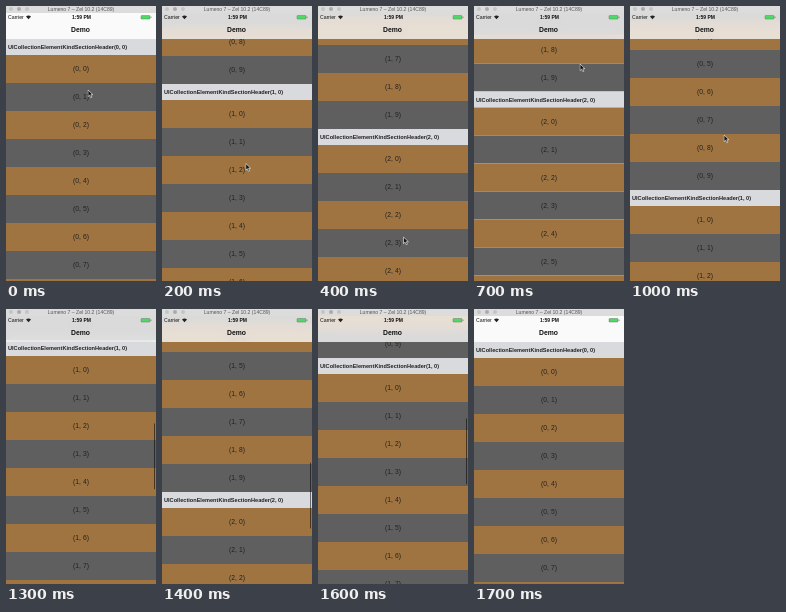
Animation, 150 px wide and 275 px high, one loop 2 s. Source, as an HTML page:

```html
<!DOCTYPE html>
<html lang="en">
<head>
<meta charset="utf-8">
<style>
  html, body { margin: 0; width: 100%; height: 100%; overflow: hidden; }
  body { position: relative; background: #fff; color: #222; font-family: "Liberation Sans", Arial, sans-serif; }
  body > * { position: absolute; }
  #list { top: 33px; left: 0; width: 150px; }
  .row { height: 28px; line-height: 28px; font-size: 6.8px; text-align: center; background: #9f7441; }
  .row.odd { background: #5f5f5f; }
  .head { height: 16px; line-height: 16px; padding-left: 2px; font-size: 5.6px; font-weight: bold; background: #d9dadd; white-space: nowrap; }
  #thumb { top: 33px; right: 1px; width: 1.2px; border-radius: 1px; background: #0008; }
  #nav { top: 7px; left: 0; width: 150px; height: 26px; background: #f9f9f9cc; backdrop-filter: blur(5px); }
  #title { top: 0; left: 0; width: 150px; height: 7px; background: #dcdcdc; }
  #icons { top: 0; left: 0; }
  #cursor { top: 0; left: 0; }
  text { fill: #111; }
</style>
</head>
<body>
<div id="list"></div>
<div id="thumb"></div>
<div id="nav"></div>
<div id="title"></div>
<svg id="icons" width="150" height="33">
  <g fill="#c4c4c4"><circle cx="5" cy="3" r="2"/><circle cx="13" cy="3" r="2" fill="#aaa"/><circle cx="21" cy="3" r="2"/></g>
  <text x="75" y="5" font-size="5.1" text-anchor="middle" style="fill:#555">Lumeno 7 – Zel 10.2 (14C89)</text>
  <text x="2" y="13" font-size="5.2">Carrier</text>
  <path d="M20 10.5q2.5-2 5 0L22.5 13.3z" fill="#222"/>
  <text x="75.5" y="13" font-size="5" font-weight="bold" text-anchor="middle">1:59 PM</text>
  <rect x="135" y="9.5" width="9" height="3.6" rx=".7" fill="#4cd964" stroke="#666" stroke-width=".4"/>
  <path d="M145 10.6v1.4" stroke="#666" stroke-width=".7"/>
  <text x="74.5" y="26" font-size="6.8" font-weight="bold" text-anchor="middle">Demo</text>
</svg>
<svg id="cursor" width="8" height="10">
  <path d="M.5.5v6.6l1.6-1.4 1.1 2.5 1.2-.5-1.1-2.5h2.1z" fill="#111" stroke="#fff" stroke-width=".6"/>
</svg>
<script>
const LOOP = 2000, STEP = 100, LAST = 1700;
const SECTIONS = 3, ROWS = 10, VIEW = 242;
const CONTENT = SECTIONS * (16 + ROWS * 28);

// Each key is [time, ...values]
const scrollKeys = [[0, 0], [400, 502], [550, 640], [700, 539.5], [1000, 145],
  [1100, 0], [1300, 298], [1400, 442], [1500, 560], [1700, 0]];
const cursorKeys = [[0, 82, 84], [400, 85.5, 231], [700, 106, 58], [1000, 94, 129], [1200, 90, 176]];

const $ = id => document.getElementById(id);

function add(className, text) {
  const el = document.createElement('div');
  el.className = className;
  el.textContent = text;
  $('list').append(el);
}

for (let s = 0; s < SECTIONS; s++) {
  add('head', `UICollectionElementKindSectionHeader(${s}, 0)`);
  for (let r = 0; r < ROWS; r++) add(r % 2 ? 'row odd' : 'row', `(${s}, ${r})`);
}
$('thumb').style.height = VIEW * VIEW / CONTENT + 'px';

function sample(keys, t) {
  const next = keys.findIndex(k => k[0] > t);
  if (next < 0) return keys.at(-1).slice(1);
  const a = keys[next - 1], b = keys[next];
  const p = (t - a[0]) / (b[0] - a[0]);
  return a.slice(1).map((v, i) => v + (b[i + 1] - v) * p);
}

function draw(now) {
  const t = Math.min(LAST, Math.floor(now % LOOP / STEP) * STEP);
  const [scroll] = sample(scrollKeys, t);
  const [x, y] = sample(cursorKeys, t);
  $('list').style.transform = `translateY(${-scroll}px)`;
  $('thumb').style.transform = `translateY(${scroll * VIEW / CONTENT}px)`;
  $('thumb').style.opacity = t >= 1200 && t < LAST ? 1 : 0;
  $('cursor').style.transform = `translate(${x - 0.5}px, ${y - 0.5}px)`;
  $('cursor').style.opacity = t < 1200 ? 1 : 0;
}

let start;
function tick(now) {
  start ??= now;
  draw(now - start);
  requestAnimationFrame(tick);
}
draw(0);
requestAnimationFrame(tick);
</script>
</body>
</html>
```
